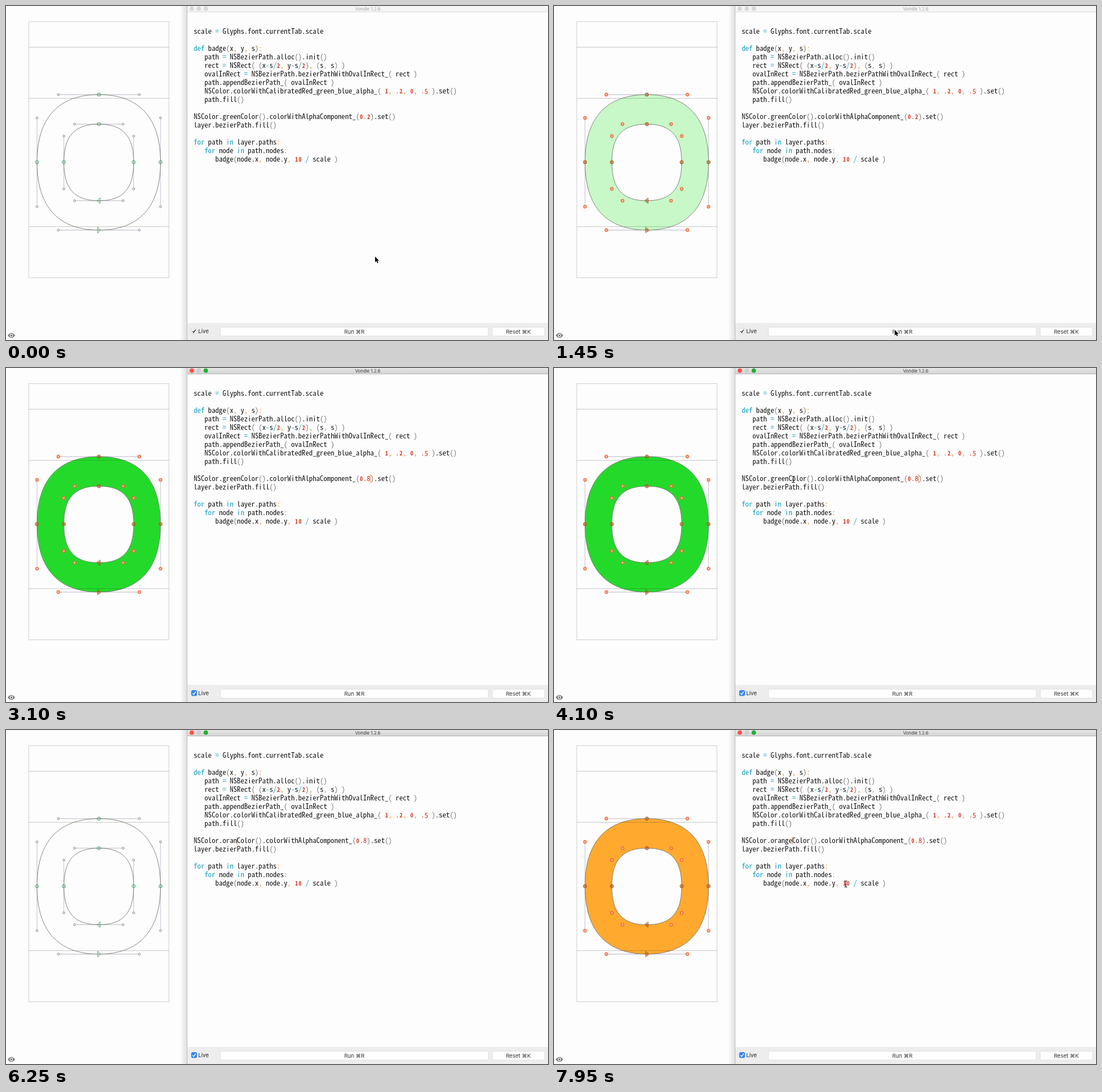
An HTML page with a canvas that plays this animation: 953x588 px, repeating every 8000 ms.

```html
<!DOCTYPE html>
<html lang="en">
<head>
<meta charset="utf-8">
<title>Live glyph scripting</title>
<style>
  html, body { margin: 0; width: 100%; height: 100%; overflow: hidden; background: #fdfdfe; }
  canvas { display: block; }
</style>
</head>
<body>
<canvas id="stage" width="953" height="588"></canvas>
<script>
const ctx = document.getElementById('stage').getContext('2d');
const LOOP = 8000;
const PAPER = '#fdfdfe';
const UI_FONT = 'Inter, Roboto, "DejaVu Sans", sans-serif';
const CODE_FONT = '"Noto Sans Mono CJK JP", "Noto Sans Mono", monospace';
const CODE_X = 330, BASELINE = 48.5, LINE = 15.02, ADVANCE = 6.34, COLOR_LINE = 10;

// Font size whose character advance fits the editor's column width.
ctx.font = `100px ${CODE_FONT}`;
const CODE_SIZE = 100 * ADVANCE / ctx.measureText('0').width;

const codeLines = (color, alpha) => `scale = Glyphs.font.currentTab.scale

def badge(x, y, s):
   path = NSBezierPath.alloc().init()
   rect = NSRect( (x-s/2, y-s/2), (s, s) )
   ovalInRect = NSBezierPath.bezierPathWithOvalInRect_( rect )
   path.appendBezierPath_( ovalInRect )
   NSColor.colorWithCalibratedRed_green_blue_alpha_( 1, .2, 0, .5 ).set()
   path.fill()

NSColor.${color}Color().colorWithAlphaComponent_(${alpha}).set()
layer.bezierPath.fill()

for path in layer.paths:
   for node in path.nodes:
      badge(node.x, node.y, 10 / scale )`.split('\n');

// Timeline
const ACTIVATE = 1950, SELECT_ALPHA = 2300, TYPE_ALPHA = 2700, SELECT_COLOR = 4400;
const KEY_TIMES = [5700, 5850, 6000, 6150, 6400, 6600];
const POINTER = [
  [0, 649, 441], [450, 599, 570], [1600, 599, 570], [2100, 638, 197],
  [3500, 638, 197], [4250, 396, 196], [4500, 396, 196], [4900, 421, 227],
  [7100, 421, 227], [7850, 513, 271]
];

function stateAt(t) {
  const typed = KEY_TIMES.filter(k => t >= k).length;
  const color = typed ? 'orange'.slice(0, typed) : 'green';
  const alpha = t < TYPE_ALPHA ? '0.2' : '0.8';
  let fill = null;
  if (typed === 6) fill = '#ffa92f';
  else if (!typed && t >= TYPE_ALPHA) fill = '#23da2b';
  else if (!typed && t >= 500) fill = '#c8f8c8';
  return { typed, color, alpha, fill, active: t >= ACTIVATE };
}

function pointerAt(t) {
  const next = POINTER.findIndex(p => p[0] > t);
  if (next < 0) return POINTER[POINTER.length - 1].slice(1);
  const [t0, x0, y0] = POINTER[next - 1], [t1, x1, y1] = POINTER[next];
  const u = (t - t0) / (t1 - t0), e = u * u * (3 - 2 * u);
  return [x0 + (x1 - x0) * e, y0 + (y1 - y0) * e];
}

// Drawing helpers
function rect(x, y, w, h, color) {
  ctx.fillStyle = color;
  ctx.fillRect(x, y, w, h);
}
function line(x0, y0, x1, y1, color, width = 1) {
  ctx.strokeStyle = color;
  ctx.lineWidth = width;
  ctx.beginPath();
  ctx.moveTo(x0, y0);
  ctx.lineTo(x1, y1);
  ctx.stroke();
}
function paint(path, fill, stroke, width = 1) {
  if (fill) { ctx.fillStyle = fill; ctx.fill(path, 'evenodd'); }
  if (stroke) { ctx.strokeStyle = stroke; ctx.lineWidth = width; ctx.stroke(path); }
}
function circle(x, y, r, fill, stroke, width) {
  const path = new Path2D();
  path.arc(x, y, r, 0, 2 * Math.PI);
  paint(path, fill, stroke, width);
}
function roundBox(x, y, w, h, r, fill, stroke) {
  const path = new Path2D();
  path.roundRect(x, y, w, h, r);
  paint(path, fill, stroke, 0.6);
}
function label(text, x, y, size, color, align = 'center') {
  ctx.font = `${size}px ${UI_FONT}`;
  ctx.fillStyle = color;
  ctx.textAlign = align;
  ctx.fillText(text, x, y);
}

// Each ring has extremes l, t, r, b and handle positions hx (left, right) and hy (top, bottom).
const CX = 163.3, CY = 275;
const RINGS = [
  { l: 54.5, t: 156, r: 271.7, b: 394.5, hx: [92, 234.5], hy: [197, 353.3], dir: 1 },
  { l: 101.7, t: 208, r: 224.5, b: 342.8, hx: [120.5, 205.8], hy: [229, 322], dir: -1 }
];
const outline = new Path2D();
for (const { l, t, r, b, hx, hy } of RINGS) {
  outline.moveTo(CX, t);
  outline.bezierCurveTo(hx[1], t, r, hy[0], r, CY);
  outline.bezierCurveTo(r, hy[1], hx[1], b, CX, b);
  outline.bezierCurveTo(hx[0], b, l, hy[1], l, CY);
  outline.bezierCurveTo(l, hy[0], hx[0], t, CX, t);
  outline.closePath();
}

function drawNodes({ l, t, r, b, hx, hy, dir }, badges) {
  const corners = [t, b].flatMap(y => hx.map(x => [x, y]))
    .concat([l, r].flatMap(x => hy.map(y => [x, y])));
  const extremes = [[CX, t], [l, CY], [r, CY], [CX, b]];
  const nodeColor = badges ? '#806a32' : '#2f9e5c';

  for (const [x, y] of corners) {
    if (badges) circle(x, y, 3.4, 'rgba(255,110,60,.72)');
    circle(x, y, 1.8, badges ? '#ffe3d4' : PAPER, badges ? '#d8592c' : '#777', 0.9);
  }
  for (const [x, y] of extremes) {
    if (badges) circle(x, y, 3.4, 'rgba(255,70,10,.5)');
    if (y === b) {
      const flag = new Path2D(`M${x - 2 * dir} ${y - 5}l${5 * dir} 5l${-5 * dir} 5z`);
      paint(flag, null, nodeColor, 0.9);
    } else {
      circle(x, y, 2.8, null, nodeColor, 1);
    }
    circle(x, y, 0.8, nodeColor);
  }
}

function drawGlyph(fill) {
  for (const { l, t, r, b, hx, hy } of RINGS) {
    for (const y of [t, b]) line(hx[0], y, hx[1], y, '#b3afbd', 0.9);
    for (const x of [l, r]) line(x, hy[0], x, hy[1], '#bfbccb', 0.9);
  }
  if (fill) paint(outline, fill);
  ctx.strokeStyle = 'rgba(40,40,30,.22)';
  ctx.lineWidth = 1;
  ctx.strokeRect(40, 27.5, 246.5, 451);
  for (const y of [72.5, 162.5, 388.5]) line(40, y, 286.5, y, 'rgba(40,40,30,.25)');
  paint(outline, null, '#77776e', 0.9);
  for (const ring of RINGS) drawNodes(ring, Boolean(fill));

  // Preview eye
  paint(new Path2D('M3 580Q9.5 571.5 16 580Q9.5 588.5 3 580z'), '#747474');
  circle(9.5, 580, 2.9, PAPER);
  circle(9.5, 580, 1.7, '#747474');
}

function drawWindow(active) {
  const shadow = ctx.createLinearGradient(306, 0, 319, 0);
  shadow.addColorStop(0, 'rgba(0,0,0,0)');
  shadow.addColorStop(1, 'rgba(0,0,0,.13)');
  rect(306, 0, 13, 588, shadow);
  rect(318, 0, 1, 588, '#c2c2c4');
  rect(319, 0, 634, 588, PAPER);

  const bar = ctx.createLinearGradient(0, 0, 0, 11);
  bar.addColorStop(0, active ? '#e7e7e7' : '#f6f6f6');
  bar.addColorStop(1, active ? '#d2d2d2' : '#f4f4f4');
  rect(319, 0, 634, 11, bar);
  rect(319, 10, 634, 1, active ? '#b9b9b9' : '#dcdcdc');
  const lights = active ? ['#fc5248', '#cfcfcf', '#1fb031'] : ['#d8d8d8', '#d8d8d8', '#d8d8d8'];
  lights.forEach((color, i) => circle(326.7 + 12.3 * i, 4.6, 3.9, color));
  label('Vondle 1.2.6', 636, 7.6, 7.8, active ? '#3d3d3d' : '#a5a5a5');

  rect(319, 558, 634, 30, '#ededed');
  roundBox(377, 565.5, 471, 15.5, 2.5, '#fefefe', '#d2d2d2');
  roundBox(855, 565.5, 92, 15.5, 2.5, '#fefefe', '#d2d2d2');
  label('Run ⌘R', 612.5, 577.3, 9.5, '#333');
  label('Reset ⌘K', 901, 577.3, 9.5, '#333');
  roundBox(326, 567.5, 9.5, 9.5, 2, active ? '#3187f5' : '#fff', active ? '#2a78df' : '#bbb');
  paint(new Path2D('M328 572.5l2 2.4l3.6-5.2'), null, active ? '#fff' : '#222', 1.3);
  label('Live', 338, 576, 9.6, '#222', 'left');
}

// Syntax colours
const TOKEN = /[A-Za-z_]\w*|\.?\d[\d.]*|\S/g;
function tokenColor(token) {
  if (/^(def|for|in|=|\/|-)$/.test(token)) return '#0c9dbd';
  if (/\d/.test(token) && !/^[A-Za-z_]/.test(token)) return '#d8341c';
  if (/[,:]/.test(token)) return '#ee8b1c';
  if (/[()]/.test(token)) return '#777';
  return '#151515';
}

// Old-style figures: 0, 1 and 2 at x-height, 5 hanging below the baseline.
function drawNumber(token, x, y) {
  ctx.textAlign = 'center';
  [...token].forEach((digit, i) => {
    const small = '012'.includes(digit);
    ctx.font = small ? `bold ${CODE_SIZE * 0.8}px ${CODE_FONT}` : `${CODE_SIZE}px ${CODE_FONT}`;
    ctx.fillText(digit, x + (i + 0.5) * ADVANCE, y + (digit === '5' ? 1.5 : 0));
  });
}

function drawCode(lines) {
  lines.forEach((text, row) => {
    const y = BASELINE + row * LINE;
    for (const { 0: token, index } of text.matchAll(TOKEN)) {
      const x = CODE_X + index * ADVANCE;
      ctx.fillStyle = tokenColor(token);
      if (/^\.?\d/.test(token)) {
        drawNumber(token, x, y);
      } else {
        ctx.font = `${CODE_SIZE}px ${CODE_FONT}`;
        ctx.textAlign = 'left';
        ctx.fillText(token, x, y);
      }
    }
  });
}

function drawSelection(t, { typed, color, alpha }, text) {
  const colorCol = text.indexOf(color + 'Color');
  const alphaEnd = text.indexOf(alpha) + alpha.length;
  const top = BASELINE + COLOR_LINE * LINE - 11;
  const select = (col, count) =>
    rect(CODE_X + col * ADVANCE, top, count * ADVANCE, 14.5, '#e6ee66');
  const caret = col => rect(CODE_X + col * ADVANCE - 0.2, top, 1, 14.5, '#f08a4a');

  if (typed) caret(colorCol + color.length);
  else if (t >= SELECT_COLOR) select(colorCol, color.length);
  else if (t >= TYPE_ALPHA) caret(alphaEnd);
  else if (t >= SELECT_ALPHA) select(alphaEnd - 1, 1);
}

const ARROW = new Path2D('M0 0V10.2L2.3 8L3.9 11.6L5.6 10.8L4 7.4H7z');
const IBEAM = new Path2D('M-2.5-5.5Q0-5.5 0-4Q0-5.5 2.5-5.5M0-4V4M-2.5 5.5Q0 5.5 0 4Q0 5.5 2.5 5.5M-1.3 1.5H1.3');
function drawPointer(t, active) {
  const hidden = (t >= TYPE_ALPHA && t < 3500) || (t >= KEY_TIMES[0] && t < 7100);
  if (hidden) return;
  ctx.save();
  ctx.translate(...pointerAt(t));
  if (active) {
    paint(IBEAM, null, 'rgba(255,255,255,.7)', 2.4);
    paint(IBEAM, null, '#111', 1.1);
  } else {
    paint(ARROW, null, '#fff', 1.6);
    paint(ARROW, '#000');
  }
  ctx.restore();
}

function frame(now) {
  const t = now % LOOP;
  const state = stateAt(t);
  const lines = codeLines(state.color, state.alpha);
  rect(0, 0, 953, 588, PAPER);
  drawGlyph(state.fill);
  drawWindow(state.active);
  drawSelection(t, state, lines[COLOR_LINE]);
  drawCode(lines);
  drawPointer(t, state.active);
  requestAnimationFrame(frame);
}
requestAnimationFrame(frame);
</script>
</body>
</html>
```
